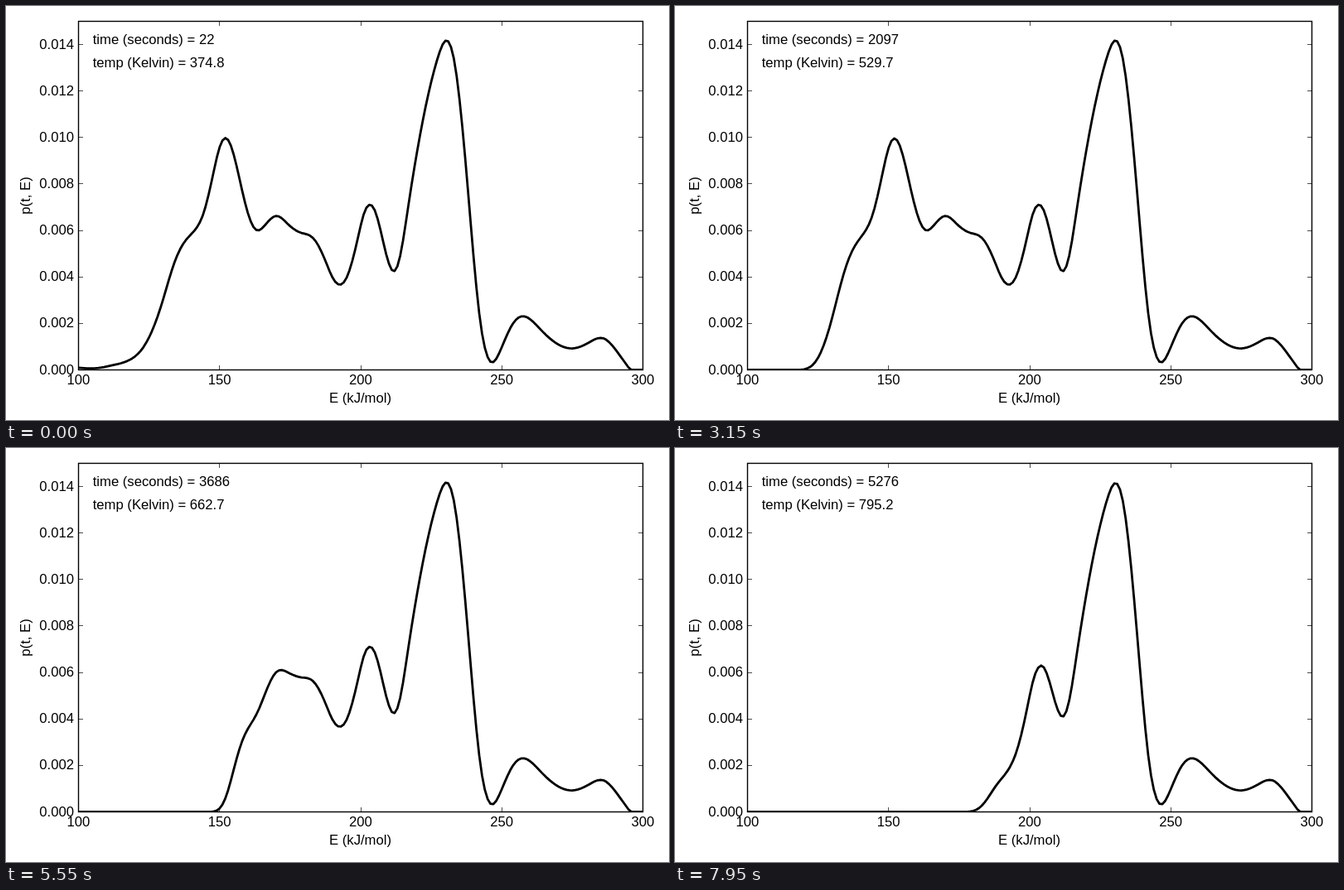
Recreate the animation shown at these times as an HTML page. Size 800x500 px, loop 8000 ms.

```html
<!DOCTYPE html>
<html lang="en">
<head>
<meta charset="utf-8">
<title>Activation energy distribution</title>
<style>
  html, body { margin: 0; width: 100%; height: 100%; overflow: hidden; background: #fff; }
  svg { display: block; width: 100vw; height: 100vh; }
  text { font: 16.67px "Liberation Sans", Arial, Helvetica, sans-serif; fill: #000; }
</style>
</head>
<body>
<svg id="stage" viewBox="0 0 800 500">
  <clipPath id="clip"><rect x="87" y="18" width="682" height="422"/></clipPath>
  <path id="curve" clip-path="url(#clip)" fill="none" stroke="#000" stroke-width="2.78" stroke-linejoin="round"/>
  <rect x="87.5" y="18.5" width="681" height="421" fill="none" stroke="#000" stroke-width="1.39"/>
  <path id="ticks" fill="none" stroke="#000" stroke-width=".7"/>
  <g id="labels"></g>
  <text x="427.5" y="479" text-anchor="middle">E (kJ/mol)</text>
  <text transform="translate(29 229) rotate(-90)" text-anchor="middle">p(t, E)</text>
  <text id="time" x="104.7" y="46"></text>
  <text id="temp" x="104.7" y="74"></text>
</svg>
<script>
const LOOP = 8000, LAST = 119, STEP_S = 44.148;
const RATE = 1e10, GAS = 8.314e-3;
const LEFT = 87.5, RIGHT = 768.5, TOP = 18.5, BASE = 439.5;
const $ = id => document.getElementById(id);

const xOf = e => LEFT + (e - 100) * (RIGHT - LEFT) / 200;
const yOf = p => BASE - p * (BASE - TOP) / 0.015;

// Initial distribution: knots of a natural cubic spline
const KNOTS = [
  [87, 436.3], [107, 437], [130, 433], [150, 426.3], [163, 415], [175, 394],
  [188, 358], [202, 312], [214, 286], [226, 272], [238, 250], [250, 201],
  [257, 171.5], [264, 159], [271, 168], [285, 224], [296, 262], [303, 270.5],
  [311, 265.5], [326, 253], [340, 263], [356, 273.5], [370, 279.5], [385, 307],
  [394, 328], [402, 336], [410, 329], [424, 281], [432, 249], [438.5, 239.5],
  [445, 247], [460, 305], [467.5, 320], [474, 307], [485, 242], [503, 136],
  [521, 61], [531, 41], [541, 68], [556, 209], [571, 373], [579, 418],
  [586, 430], [596, 416], [609, 387], [621, 374.5], [645, 390.5], [664, 407],
  [684, 413], [703, 406], [720, 400.7], [740, 421], [753, 439]
];

// Temperature along the ramp: [step, kelvin]
const RAMP = [[0, 374.8], [6, 383.7], [13, 404.9], [23, 440.5], [47, 529.7],
  [71, 619.3], [83, 662.7], [101, 728.7], [119, 795.2]];

function segment(keys, x) {
  let i = 0;
  while (i < keys.length - 2 && x >= keys[i + 1][0]) i++;
  return i;
}

function kelvin(n) {
  const i = segment(RAMP, n), [a, ta] = RAMP[i], [b, tb] = RAMP[i + 1];
  return ta + (tb - ta) * (n - a) / (b - a);
}

const width = i => KNOTS[i + 1][0] - KNOTS[i][0];
const slope = i => (KNOTS[i + 1][1] - KNOTS[i][1]) / width(i);

// Second derivatives at the knots (tridiagonal solve)
function curvatures() {
  const last = KNOTS.length - 1, c = [0], d = [0], m = Array(last + 1).fill(0);
  for (let i = 1; i < last; i++) {
    const a = width(i - 1), b = width(i), q = 2 * (a + b) - a * c[i - 1];
    c[i] = b / q;
    d[i] = (6 * (slope(i) - slope(i - 1)) - a * d[i - 1]) / q;
  }
  for (let i = last - 1; i > 0; i--) m[i] = d[i] - c[i] * m[i + 1];
  return m;
}
const bend = curvatures();

function startHeight(x) {
  if (x >= KNOTS[KNOTS.length - 1][0]) return 0;
  const i = segment(KNOTS, x), h = width(i), u = (x - KNOTS[i][0]) / h, v = 1 - u;
  const y = v * KNOTS[i][1] + u * KNOTS[i + 1][1]
    + h * h / 6 * ((v ** 3 - v) * bend[i] + (u ** 3 - u) * bend[i + 1]);
  return Math.max(0, 439 - y);
}

const samples = Array.from({ length: 201 }, (_, i) => {
  const e = 100 + i, x = xOf(e);
  return { e, x, h: startHeight(x - 0.3) };
});

// First-order loss: p = p0 * exp(-integral of RATE * exp(-E / RT))
function curvePath(n) {
  const rt = Array.from({ length: n + 1 }, (_, m) => GAS * kelvin(m));
  return "M" + samples.map(({ e, x, h }) => {
    let sum = 0;
    rt.forEach((r, m) => { sum += Math.exp(-e / r) * (m === n ? 0.5 : 1); });
    const y = BASE - h * Math.exp(-RATE * STEP_S * sum);
    return x.toFixed(2) + " " + y.toFixed(2);
  }).join("L");
}

function addLabel(x, y, anchor, str) {
  const t = document.createElementNS("http://www.w3.org/2000/svg", "text");
  t.setAttribute("x", x);
  t.setAttribute("y", y);
  t.setAttribute("text-anchor", anchor);
  t.textContent = str;
  $("labels").append(t);
}

function drawAxes() {
  const snap = v => Math.floor(v) + 0.5;
  let d = "";
  for (let e = 100; e <= 300; e += 50) {
    const x = snap(xOf(e));
    d += `M${x} ${TOP}v5.5M${x} ${BASE}v-5.5`;
    addLabel(xOf(e) - 0.2, 457, "middle", e);
  }
  for (let i = 0; i <= 7; i++) {
    const y = snap(yOf(i * 0.002));
    d += `M${LEFT} ${y}h5.5M${RIGHT} ${y}h-5.5`;
    addLabel(82, Math.round(yOf(i * 0.002) + 5), "end", (i * 0.002).toFixed(3));
  }
  $("ticks").setAttribute("d", d);
}

let shown = -1;
function render(ms) {
  // 15 steps per second, held on a 50 ms clock
  const tick = Math.floor((ms % LOOP) / 50) * 50;
  const n = Math.min(LAST, Math.max(0, Math.ceil(tick * 3 / 200 - 0.5)));
  if (n === shown) return;
  shown = n;
  $("curve").setAttribute("d", curvePath(n));
  $("time").textContent = "time (seconds) = " + (STEP_S * (n + 0.5)).toFixed(0);
  $("temp").textContent = "temp (Kelvin) = " + kelvin(n).toFixed(1);
}

drawAxes();
render(0);
const start = performance.now();
(function loop() {
  render(performance.now() - start);
  requestAnimationFrame(loop);
})();
</script>
</body>
</html>
```
